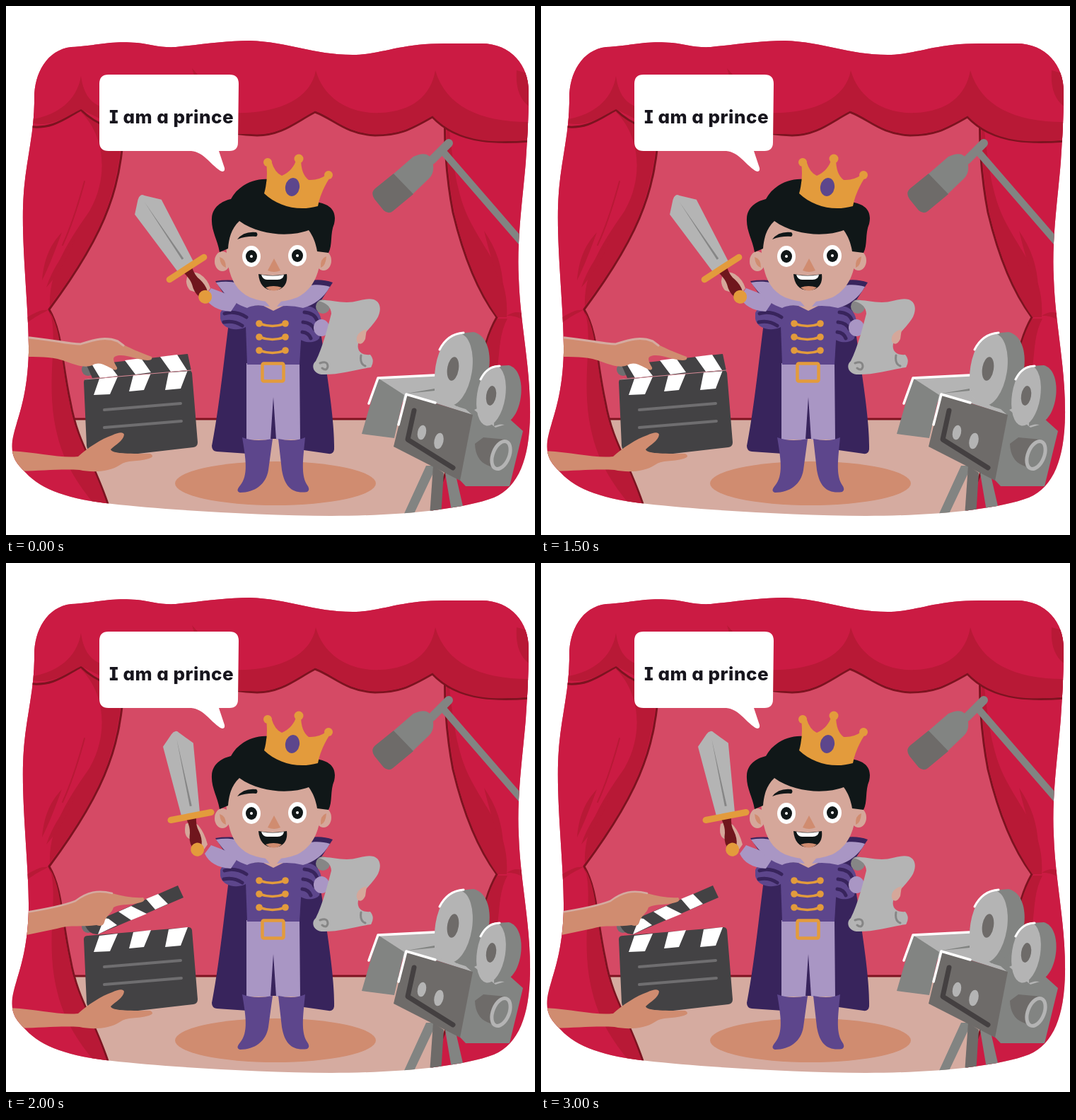
These frames come from a looping animation (748x748 px, 3.5 s). An HTML page:

```html
<!DOCTYPE html>
<html lang="en">
<head>
<meta charset="utf-8">
<title>On stage</title>
<style>
  html, body { margin: 0; width: 100%; height: 100%; overflow: hidden; background: #fff; }
  svg { display: block; width: 100vw; height: 100vh; }
  .open .shut-only, svg:not(.open) .open-only { display: none; }
  .line { fill: none; stroke-linecap: round; stroke-linejoin: round; }
  .red { fill: #cb1b43; } .deep { fill: #b81936; } .seam { stroke: #7d1320; stroke-width: 3; }
  .skin { fill: #d5a79a; } .tan { fill: #d08c70; }
  .plum { fill: #5d468c; } .night { fill: #38245c; } .lilac { fill: #a996c4; } .gold { fill: #e39b3c; }
  .ink { fill: #101718; } .white { fill: #fff; } .slate { fill: #434244; }
  .pale { fill: #b4b4b4; } .mid { fill: #828482; } .dim { fill: #6e6b69; }
  .say { font: 800 26px Inter, "Noto Sans", sans-serif; font-feature-settings: "cv08", "cv11"; letter-spacing: .5px; fill: #17151d; }
</style>
</head>
<body>
<svg id="stage" viewBox="0 0 748 748">
  <defs>
    <clipPath id="frame">
      <path d="M40 130C40 95 58 62 92 58C130 56 145 49 185 52C205 54 215 59 240 58C280 54 310 49 345 49C400 51 435 69 490 69C530 69 555 53 620 53H672C715 53 739 85 739 120C739 160 737 190 735 220C731 270 722 330 725 385C727 450 742 510 741 580C740 640 725 680 690 695C640 714 540 721 460 721C350 720 220 712 150 704C90 698 50 684 28 660C12 645 7 635 9 615C14 585 30 560 32 490C33 430 20 330 25 265C28 220 41 175 40 130Z"/>
    </clipPath>
  </defs>

  <g clip-path="url(#frame)">
    <!-- backdrop and floor -->
    <path fill="#d54a65" d="M0 40H748V590H0Z"/>
    <path fill="#d5aba0" d="M0 585H748V748H0Z"/>
    <path class="line seam" d="M60 584H700"/>
    <ellipse class="tan" cx="381" cy="675" rx="142" ry="31"/>

    <!-- left curtain -->
    <path class="red seam" d="M-5 130H168C167 195 162 240 145 285C128 332 96 382 61 429C80 462 78 500 91 560C101 618 125 645 146 710L-5 730Z"/>
    <path class="deep" d="M106 150C142 186 144 245 118 290C92 328 60 372 62 424C98 376 126 332 143 285C158 240 164 205 165 150Z"/>
    <path class="deep" d="M62 432C74 470 58 520 68 585C78 645 102 676 126 706H143C124 645 100 618 90 562C77 505 80 462 62 432Z"/>
    <path class="deep" d="M51 388C54 350 68 332 79 320C68 350 60 370 51 388ZM57 398C66 370 84 346 99 328C86 360 70 384 57 398ZM30 440C44 432 51 429 60 430C52 434 40 440 30 448Z"/>
    <path class="line" stroke="#b81936" stroke-width="2" d="M111 248C101 285 92 312 80 338"/>

    <!-- right curtain -->
    <path class="red seam" d="M750 130H622C618 180 622 240 632 292C644 342 664 400 694 440C672 478 672 520 655 570C640 630 612 670 600 725H750Z"/>
    <path class="deep" d="M624 150C632 220 636 262 654 300C680 352 712 380 708 440H695C668 402 646 346 634 292C624 240 622 190 624 150Z"/>
    <path class="deep" d="M695 442H709C694 470 700 500 690 540H664C674 510 675 474 695 442Z"/>
    <path class="deep" d="M676 318C684 350 690 374 703 398C702 370 694 344 676 318ZM708 438C716 433 722 432 729 434V443C720 438 714 438 708 438Z"/>

    <!-- valance -->
    <path class="red seam" d="M20 40H755V190C700 195 640 197 603 157C570 176 555 183 522 183C480 181 464 160 437 150C410 164 390 183 355 183C310 182 285 170 268 150C230 190 150 190 106 147C86 157 66 176 30 170Z"/>
    <path class="deep" d="M39 166C66 171 84 157 106 146L134 160V142C117 136 109 120 106 99C100 134 74 153 39 160Z"/>
    <path class="deep" d="M320 151C384 153 431 132 438 91C450 134 490 153 530 151C574 149 601 127 607 91C622 142 670 164 740 164V189C690 194 640 194 603 155C570 174 555 181 522 181C480 179 464 158 437 148C410 162 390 181 355 181H320Z"/>
    <path class="deep" d="M722 91C720 118 728 134 741 143V96ZM263 88L272 98H266Z"/>

    <!-- boom microphone -->
    <path class="line" stroke="#828482" stroke-width="10" d="M619 207L735 341"/>
    <path class="line" stroke="#828482" stroke-width="12" d="M602 218L626 194"/>
    <path class="mid" d="M546 239L576 213Q597 203 603 219Q607 236 598 244L574 267Z"/>
    <path class="dim" d="M548 237L576 266L547 290Q541 295 534 289L521 273Q515 264 522 258Z"/>

    <!-- camera tripod and body -->
    <path class="mid" d="M594 650H609L575 722H561ZM620 655L637 668L649 720H631Z"/>
    <path class="dim" d="M604 650L619 660L615 722H599Z"/>
    <path class="pale" d="M526 526L606 522L625 550L566 550L556 570L540 565Z"/>
    <path class="mid" d="M526 526L503 605L549 611L563 550Z"/>
    <path class="line" stroke="#fff" stroke-width="3.5" d="M513 562L526 526L606 522"/>
    <path class="mid" d="M566 548L606 541L680 555L731 601L712 679H650L632 660L655 577Z"/>
    <path class="pale" d="M606 525Q610 560 650 570L659 578L566 548L606 544ZM662 571L676 565Q680 592 705 592L692 596Z"/>
    <path class="dim" d="M566 549L660 578L642 671L548 623Z"/>
    <path class="line" stroke="#fff" stroke-width="3.5" d="M555 592L566 549L607 561"/>
    <path class="line" stroke="#444041" stroke-width="7" d="M577 572L568 613L632 653"/>
    <g class="pale">
      <ellipse cx="588" cy="603" rx="6" ry="10.5" transform="rotate(12 588 603)"/>
      <ellipse cx="612" cy="615" rx="6.5" ry="11.5" transform="rotate(12 612 615)"/>
    </g>
    <path class="dim" d="M663 619L675 610L707 613L696 656L680 649Q664 642 663 619Z"/>
    <ellipse class="mid" cx="700" cy="635" rx="11.5" ry="20.5" transform="rotate(22 700 635)" stroke="#b4b4b4" stroke-width="5"/>

    <!-- film reels -->
    <path class="mid" d="M640 463L661 461C692 468 689 528 666 553L636 566Z"/>
    <ellipse class="pale" cx="633" cy="514" rx="26" ry="52" transform="rotate(9 633 514)"/>
    <path class="line" stroke="#fff" stroke-width="3" d="M613 486C621 470 633 463 647 462"/>
    <ellipse class="dim" cx="632" cy="513" rx="8" ry="17" transform="rotate(9 632 513)"/>
    <path class="mid" d="M692 509L711 508C737 515 732 575 710 588L690 594Z"/>
    <ellipse class="pale" cx="686" cy="551" rx="20" ry="43" transform="rotate(9 686 551)"/>
    <path class="line" stroke="#fff" stroke-width="3" d="M671 528C678 514 687 509 698 509"/>
    <ellipse class="dim" cx="686" cy="551" rx="7" ry="14" transform="rotate(9 686 551)"/>

    <!-- cape, legs and boots -->
    <path class="night" d="M318 425C308 500 302 565 291 622Q291 629 298 630L342 633V612H414V627L456 633Q463 634 464 627C465 580 450 500 440 425Z"/>
    <path class="lilac" d="M340 505H415L416 613H382L378 553L374 613H340Z"/>
    <path class="plum" d="M334 610Q352 617 377 612L371 656C368 676 352 688 331 688Q324 686 331 678C343 664 339 640 334 610ZM385 612Q408 617 423 610C420 640 417 662 425 676Q431 684 426 687C405 690 394 680 390 656Z"/>

    <!-- torso and arms -->
    <path class="night" d="M296 389Q320 385 345 392H415Q440 383 462 391L440 425H320Z"/>
    <path class="plum" d="M338 424H420L415 507H341Z"/>
    <path class="plum" d="M303 434C309 420 330 417 346 426V448C336 462 306 460 303 442ZM414 427C434 418 448 434 446 452L443 470C436 478 420 476 414 470Z"/>
    <path class="line" stroke="#38245c" stroke-width="5" d="M309 435Q324 430 340 440M308 447Q322 444 334 452M422 433Q436 434 440 445M420 447Q432 448 436 457M419 461Q428 462 431 470"/>
    <path class="lilac" d="M290 399L330 414L318 432C300 431 287 424 281 411Z"/>
    <path class="skin" d="M360 412H396V422L378 431L360 422Z"/>
    <path class="lilac" d="M297 391C326 386 350 396 373 425Q350 421 341 427C323 421 312 412 297 391ZM458 397C434 390 406 396 383 425Q402 422 420 427Q445 420 458 397Z"/>
    <g id="braids"></g>
    <rect x="362.500" y="505.500" width="30" height="25" rx="2" fill="none" stroke="#e39b3c" stroke-width="4.500"/>

    <!-- scroll -->
    <ellipse class="lilac" cx="446" cy="455" rx="11" ry="12"/>
    <circle cx="448" cy="425" r="10" fill="#868686"/>
    <path class="pale" d="M442 417C456 414 465 419 482 419C498 419 508 412 520 415C531 419 531 432 524 443C513 460 492 473 499 487Q503 494 515 493Q522 501 516 511C495 514 470 522 446 521C434 519 431 508 438 502C448 482 455 454 460 435Q459 421 442 417Z"/>
    <path class="line" stroke="#868686" stroke-width="3" d="M444 505Q455 501 455 510Q453 517 447 512M502 494Q500 506 508 509"/>
    <path class="skin" d="M510 457Q502 459 498 464Q494 470 497 476Q503 481 508 471Z"/>

    <!-- head -->
    <g class="skin">
      <ellipse cx="306" cy="361" rx="11" ry="14"/>
      <ellipse cx="449" cy="360" rx="11" ry="14"/>
      <path d="M311 300H446C447 345 450 393 412 412Q378 425 345 412C309 395 311 350 311 300Z"/>
    </g>
    <path class="tan" d="M302 355Q311 357 311 370Q303 368 302 355ZM453 354Q444 357 445 370Q452 368 453 354Z"/>
    <path class="ink" d="M302 348C299 330 290 318 291 300C292 284 305 276 318 273C328 254 350 243 372 245L438 277C460 280 468 291 464 308C458 322 462 338 456 349L440 347C438 335 434 325 428 317C405 326 360 326 330 304C318 315 315 330 314 343Z"/>
    <path class="ink" d="M327 330Q336 318 354 320Q357 323 354 326Q340 325 327 330Z"/>
    <g id="eyes"></g>
    <path class="tan" d="M379 357L388 374Q379 378 370 374Z"/>
    <path class="ink" d="M357 379Q377 383 397 379C399 395 390 402 378 402C365 402 358 393 357 379Z"/>
    <path class="white" d="M361 380Q377 383 393 380Q392 387 384 387H369Q363 387 361 380Z"/>
    <path class="tan" d="M367 398Q378 394 390 398Q379 407 367 398Z"/>

    <!-- crown -->
    <g class="gold">
      <path d="M368 222L375 219Q380 236 390 240Q406 233 411 216H417Q417 238 428 246Q442 247 454 238L459 241Q445 262 441 283C413 291 384 283 365 265Q371 244 368 222Z"/>
      <circle cx="370" cy="221" r="6"/><circle cx="414" cy="216" r="6.500"/><circle cx="456" cy="239" r="6"/>
    </g>
    <ellipse class="plum" cx="405" cy="256" rx="10" ry="13" transform="rotate(10 405 256)"/>

    <!-- sword arm -->
    <path class="skin shut-only" d="M258 379Q266 374 274 379Q285 386 289 399L281 409L260 402Q251 391 258 379Z"/>
    <path class="skin open-only" d="M254 369Q264 363 272 371Q281 382 285 398L278 408L262 391Q250 388 254 369Z"/>
    <g id="sword">
      <path class="pale" d="M2 -122Q-2 -122 -5 -119L-20 -104L-13 0H13L23 -101L6 -119Q4 -122 2 -122Z"/>
      <path fill="#868686" d="M1 -112L4 -14H1Z"/>
      <path fill="#70161d" d="M-7 3H7Q4 15 7 23Q10 34 7 43H-7Q-10 34 -6 23Q-4 15 -7 3Z"/>
      <path class="line" stroke="#e39b3c" stroke-width="9" d="M-29 0H29"/>
      <circle class="gold" cy="48" r="9.500"/>
    </g>

    <!-- clapperboard -->
    <path class="slate" d="M110 532Q110 527 116 527L258 515Q262 515 263 519L271 617Q271 623 265 624L178 634L118 628Q115 628 114 622Z"/>
    <path class="white" d="M132 527L158 524L147 549L124 550ZM180 522L205 519L195 543L174 545ZM230 518L257 515L247 541L225 543Z"/>
    <path class="line" stroke="#6f6e70" stroke-width="4" d="M139 571L247 562M139 596L248 587"/>
    <circle cx="116" cy="514" r="9" fill="#6f6e70"/>
    <g class="shut-only">
      <path class="slate" d="M114 508L257 492L262 516L122 526Z"/>
      <path class="white" d="M121 506L143 503L158 523L133 526ZM168 501L191 498L205 518L183 521ZM218 496L242 493L256 515L233 517Z"/>
      <path class="line" stroke="#d58a96" d="M112 528L262 515"/>
      <path class="tan" d="M20 468C60 470 85 478 105 478C125 472 140 467 158 474C172 483 190 490 206 496Q208 501 200 501C185 500 172 493 160 494C150 495 150 500 157 511Q158 516 152 514C140 508 132 502 122 508C110 513 95 506 80 501C60 495 45 497 20 496Z"/>
      <path class="line" stroke="#d5aba0" stroke-width="3" d="M20 468C60 470 85 478 105 478C125 472 140 467 158 474L166 480"/>
    </g>
    <g class="open-only">
      <path class="slate" d="M112 513L243 456L251 473L130 525Q118 526 112 513Z"/>
      <path class="white" d="M139 502L145 503L157 512L130 525ZM159 493L177 485L199 496L177 505ZM198 475L215 468L229 482L211 490Z"/>
      <path class="tan" d="M15 496C55 490 80 485 98 478C115 465 130 462 150 467C165 471 180 474 194 473Q199 479 186 481C172 484 160 482 152 487C150 495 141 499 139 508Q137 515 128 512C110 515 90 511 72 517L15 529Z"/>
      <path class="line" stroke="#d5aba0" stroke-width="2.500" d="M15 496C55 490 80 485 98 478C115 465 130 462 150 467"/>
    </g>
    <path class="tan" d="M0 629C40 630 75 640 102 637C115 625 135 612 150 607Q165 600 167 606C166 615 155 620 148 627C150 633 170 633 204 633Q211 637 202 640C185 645 172 641 161 649C146 659 122 660 104 656C70 654 40 659 0 657Z"/>
  </g>

  <!-- speech bubble -->
  <path class="white" d="M145 97H316Q329 97 329 110L328 193Q328 205 316 205H301L309 229Q310 236 303 233C288 223 280 207 262 205H145Q132 205 132 192V110Q132 97 145 97Z"/>
  <text class="say" x="234" y="166" text-anchor="middle">I am a prince</text>
</svg>
<script>
  const LOOP = 3500, BEAT = 500, HOLD = 1000;
  const $ = id => document.getElementById(id);
  const stage = $('stage'), sword = $('sword');

  $('braids').innerHTML = [449, 468, 487].map(y => `
    <path class="line" stroke="#e39b3c" stroke-width="3.500" d="M358 ${y}Q377 ${y + 7} 395 ${y}"/>
    <circle class="gold" cx="358" cy="${y}" r="4.800"/><circle class="gold" cx="395" cy="${y}" r="4.800"/>`).join('');

  $('eyes').innerHTML = [[347, 354], [412, 353]].map(([x, y]) => `
    <ellipse class="white" cx="${x}" cy="${y}" rx="13" ry="15"/>
    <ellipse class="ink" cx="${x}" cy="${y}" rx="8" ry="9"/>
    <circle class="white" cx="${x}" cy="${y}" r="2"/>`).join('');

  // The board rests shut for the first second, then opens and shuts on each beat.
  function draw() {
    const t = performance.now() % LOOP;
    const open = t >= HOLD && Math.floor(t / BEAT) % 2 === 0;
    stage.classList.toggle('open', open);
    sword.setAttribute('transform', open
      ? 'translate(261.5 358) rotate(-11)'
      : 'translate(255.5 371) rotate(-33)');
    requestAnimationFrame(draw);
  }
  draw();
</script>
</body>
</html>
```
